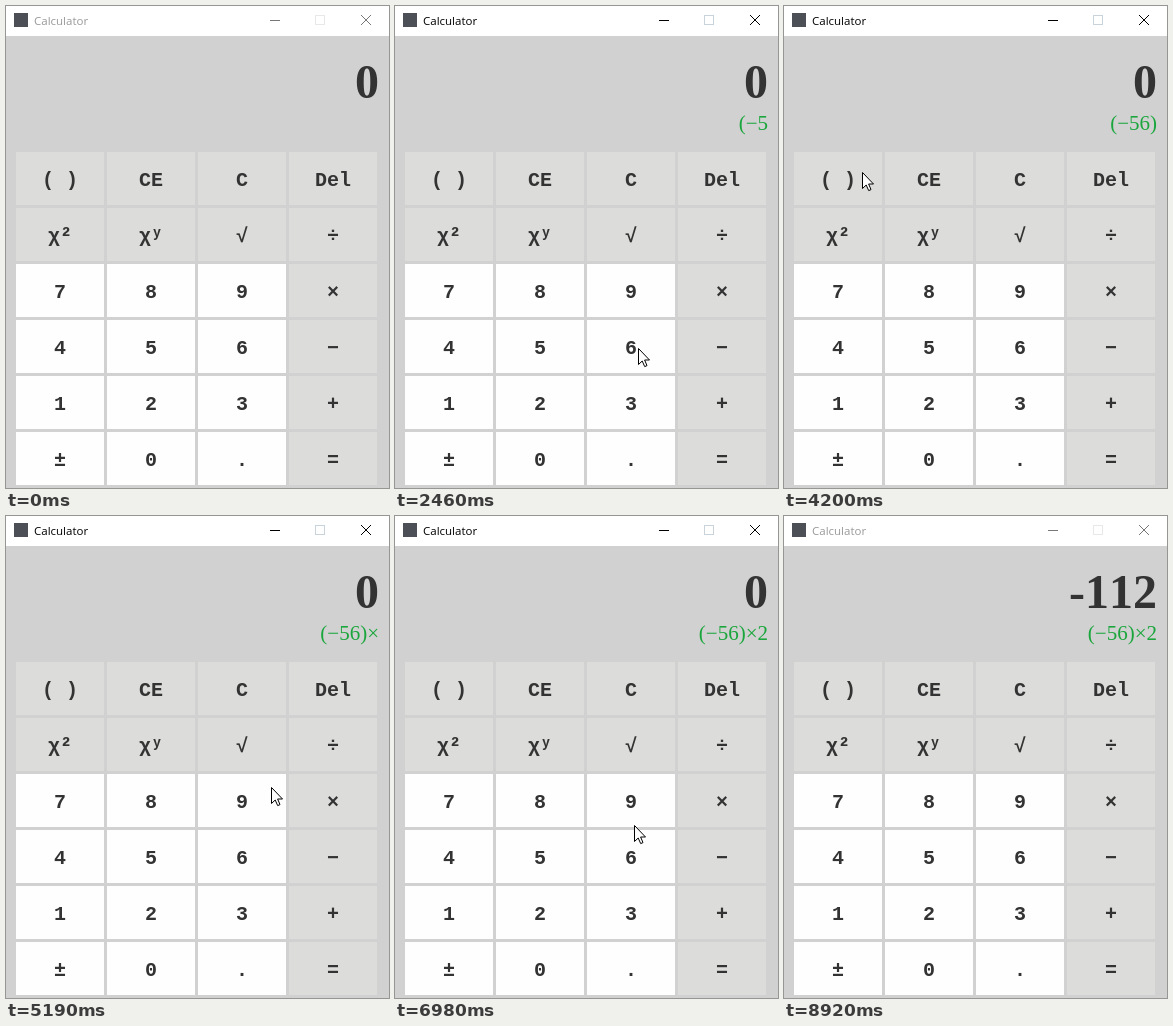
Animation, 383 px wide and 482 px high, one loop 9.12 s. Source, as an HTML page with a canvas:

```html
<!DOCTYPE html>
<html lang="en">
<head>
<meta charset="utf-8">
<title>Calculator</title>
<style>
html, body { margin: 0; width: 100%; height: 100%; overflow: hidden; }
canvas { display: block; }
</style>
</head>
<body>
<canvas id="stage" width="383" height="482"></canvas>
<script>
const ctx = document.getElementById('stage').getContext('2d');
const LOOP = 9120, TICK = 66.5;
const ENTER = 260, EXIT = 8520, BLUR = 8920;
const ARRIVE = 340, PRESS = 130, LEAVE = 140; // ms before, before and after a release
const SERIF = '"Liberation Serif", serif';
const MONO = 'bold 20px "Liberation Mono", "DejaVu Sans Mono", monospace';
const KEYS = ['( )', 'CE', 'C', 'Del', 'χ²', 'χʸ', '√', '÷', '7', '8', '9', '×',
  '4', '5', '6', '−', '1', '2', '3', '+', '±', '0', '.', '='];

// Each click: when the key is released, where, and the bend of the way there
const CLICKS = [
  { key: '±', adds: '(−', up: 730, at: [44, 458], bend: [45, 470] },
  { key: '5', adds: '5', up: 1530, at: [155, 329], bend: [100, 394] },
  { key: '6', adds: '6', up: 2800, at: [243, 342], bend: [320, 245] },
  { key: '( )', adds: ')', up: 4060, at: [78, 166], bend: [130, 495] },
  { key: '×', adds: '×', up: 4860, at: [332, 290], bend: [0, 380] },
  { key: '2', adds: '2', up: 6250, at: [156, 408], bend: [150, 218] },
  { key: '=', adds: '', up: 8050, at: [333, 460], bend: [252, 187] }
];
const ENTRY = { up: ENTER - LEAVE, at: [46, 482] };
const ARROW = new Path2D('M.5 .5V16.5L4.2 13L6.7 18.6L9 17.6L6.6 12H11.5Z');

function text(str, x, y, font, color, align) {
  ctx.font = font;
  ctx.fillStyle = color;
  ctx.textAlign = align;
  ctx.fillText(str, x, y);
}

function rect(x, y, w, h, color) {
  ctx.fillStyle = color;
  ctx.fillRect(x, y, w, h);
}

function drawTitleBar(active) {
  const ink = active ? '#000' : '#777';
  rect(0, 0, 383, 30, '#fff');
  rect(8, 7, 14, 14, '#4c4f56');
  text('Calculator', 28, 19, '11.5px "Open Sans", sans-serif', active ? '#000' : '#999', 'left');
  rect(264, 14, 10, 1, ink);
  ctx.strokeStyle = active ? '#c8d3dc' : '#e8e8e8';
  ctx.strokeRect(309.5, 9.5, 9, 9);
  ctx.strokeStyle = ink;
  ctx.stroke(new Path2D('M355 9L365 19M365 9L355 19'));
}

function drawKeys(pressed) {
  KEYS.forEach((key, i) => {
    const col = i % 4, row = Math.floor(i / 4);
    const x = 10 + col * 91, y = 146 + row * 56;
    const base = row > 1 && col < 3 ? '#fefefe' : '#dcdcda';
    rect(x, y, 88, 53, key === pressed ? '#b8cfe5' : base);
    text(key, x + 44, y + 34, MONO, '#333', 'center');
  });
}

// Quadratic curve from one click to the next, resting around each release
function pointerAt(t) {
  const found = CLICKS.findIndex(c => t < c.up + LEAVE);
  const i = found < 0 ? CLICKS.length - 1 : found;
  const from = CLICKS[i - 1] || ENTRY, to = CLICKS[i];
  const start = from.up + LEAVE, end = to.up - ARRIVE;
  const k = Math.min(Math.max((t - start) / (end - start), 0), 1), r = 1 - k;
  return [0, 1].map(a => Math.round(r * r * from.at[a] + 2 * r * k * to.bend[a] + k * k * to.at[a]));
}

function drawPointer(t) {
  ctx.save();
  ctx.translate(...pointerAt(t));
  ctx.fillStyle = '#fff';
  ctx.fill(ARROW);
  ctx.strokeStyle = '#000';
  ctx.stroke(ARROW);
  ctx.restore();
}

function draw(t) {
  const held = CLICKS.find(c => t >= c.up - PRESS && t < c.up);
  const done = CLICKS.filter(c => t >= c.up);
  const result = done.length === CLICKS.length ? '-112' : '0';
  rect(0, 0, 383, 482, '#d1d1d1');
  drawTitleBar(t >= CLICKS[0].up - PRESS && t < BLUR);
  text(result, 373, 92, 'bold 48px ' + SERIF, '#333', 'right');
  text(done.map(c => c.adds).join(''), 373, 124, '21px ' + SERIF, '#1aa63c', 'right');
  drawKeys(held && held.key);
  if (t >= ENTER && t < EXIT) drawPointer(Math.floor((t + 8) / TICK) * TICK);
}

ctx.fontKerning = 'none';
const start = performance.now();
function tick() {
  draw((performance.now() - start) % LOOP);
  requestAnimationFrame(tick);
}
tick();
</script>
</body>
</html>
```
